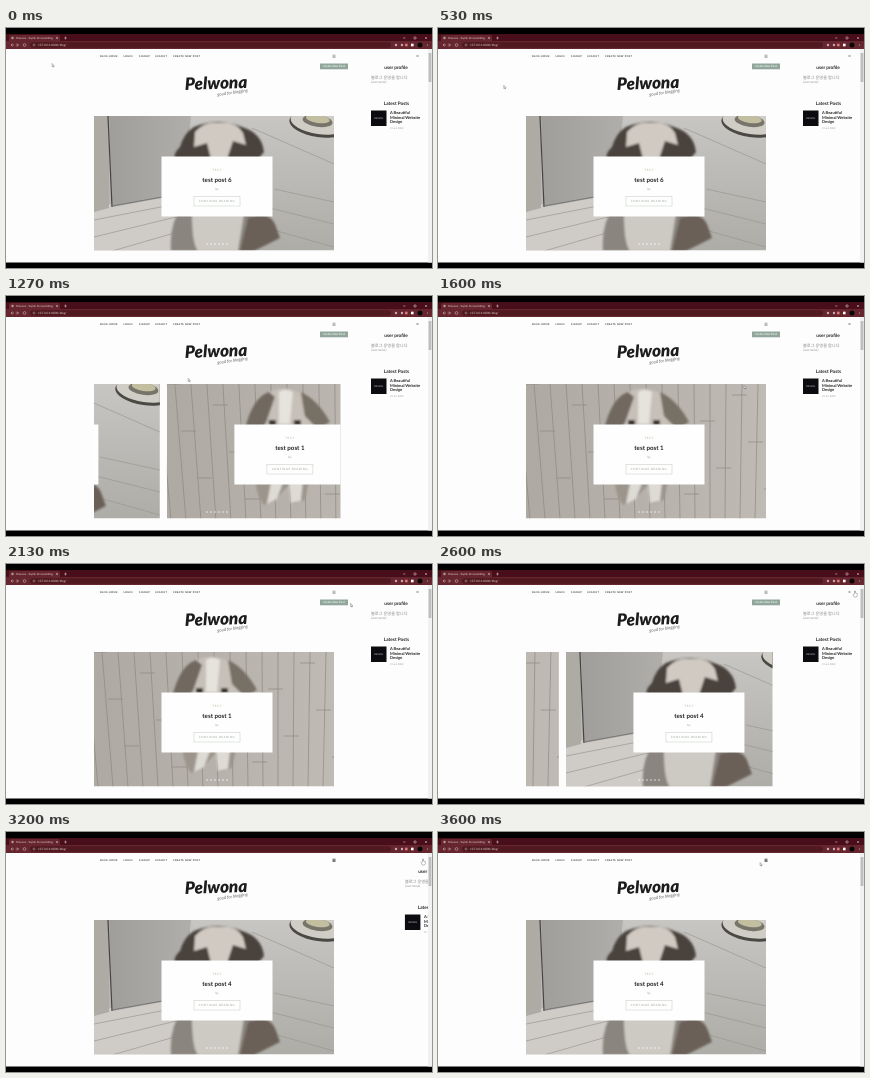
An HTML page for the animation above (3670 ms loop, 426 by 240 pixels).

```html
<!DOCTYPE html>
<html lang="en">
<head>
<meta charset="utf-8">
<title>Blog page</title>
<style>
html, body { margin: 0; width: 100%; height: 100%; overflow: hidden; background: #000; }
svg { display: block; width: 426px; height: 240px; }
text { font: 700 2.5px Lato, sans-serif; fill: #222; text-rendering: geometricPrecision; }
.mid { text-anchor: middle; }
.nav { letter-spacing: .3px; fill: #444; }
.chrome { font-weight: 400; font-size: 3px; fill: #e6d3d6; }
.head { font-size: 4.7px; }
.post { font-size: 4px; }
.soft { font-weight: 400; fill: #999; }
.korean { font: 400 4.2px "Noto Sans CJK KR", "Noto Sans CJK", sans-serif; fill: #888; }
.title { font-size: 6.2px; }
.logo { font-size: 17px; font-weight: 900; font-style: italic; fill: #1c1c1c; }
.tag { font-size: 4.3px; font-weight: 400; font-style: italic; fill: #666; }
</style>
</head>
<body>
<svg viewBox="0 0 426 240">
  <defs>
    <clipPath id="carousel"><rect x="88" y="88" width="246.5" height="134.5"/></clipPath>
    <clipPath id="photo"><rect width="240" height="134.5"/></clipPath>
    <clipPath id="page"><rect y="21" width="422" height="213"/></clipPath>
    <linearGradient id="door"><stop stop-color="#a09e9b"/><stop offset="1" stop-color="#b0aeab"/></linearGradient>
    <linearGradient id="floor" x2="0" y2="1"><stop stop-color="#c8c6c3"/><stop offset="1" stop-color="#aeaca7"/></linearGradient>
    <linearGradient id="wood"><stop stop-color="#aeaaa3"/><stop offset="1" stop-color="#bfbbb4"/></linearGradient>
    <filter id="blur"><feGaussianBlur stdDeviation=".9"/></filter>

    <g id="roomDog" clip-path="url(#photo)">
      <rect width="240" height="135" fill="url(#floor)"/>
      <path d="M0 92 86 72 100 135H0z" fill="#cfccc7"/>
      <path d="M0 104 82 88M0 121 82 101M18 135 84 116M180 73 240 86M172 91 240 108M176 113 240 131M158 12 240 48" stroke="#9a9792" stroke-width=".7"/>
      <path d="M0 0H15V92L0 96z" fill="#aeaaa4"/>
      <path d="M15 0H97L90 78 18 91z" fill="url(#door)"/>
      <path d="M14 0 18 91" stroke="#444" stroke-width="1.2"/>
      <path d="M18 90 90 77" stroke="#777"/>
      <g transform="rotate(8 224 9)">
        <ellipse cx="225" cy="8" rx="30" ry="13" fill="#4a4944"/>
        <ellipse cx="225" cy="6" rx="29" ry="12" fill="#cfcdc5"/>
        <ellipse cx="223" cy="5" rx="15" ry="6" fill="#77746a"/>
        <ellipse cx="223" cy="3" rx="12" ry="4" fill="#c2bea0"/>
      </g>
      <g filter="url(#blur)">
        <path d="M88 90Q75 108 77 135H160L158 92z" fill="#8a857e"/>
        <path d="M98 98Q98 128 104 135H144L150 98z" fill="#cdc9c3"/>
        <path d="M154 102Q174 94 181 108L186 122 160 135H146z" fill="#6a6158"/>
        <path d="M100 11Q125 1 148 11Q168 17 170 36L160 48H84Q76 40 86 31Q90 17 100 11z" fill="#4a423c"/>
        <path d="M101 16Q111 5 124 7Q142 4 149 17L152 29 139 25 133 43H117L113 27 100 31z" fill="#d0cac2"/>
      </g>
    </g>

    <g id="floorDog" clip-path="url(#photo)">
      <rect width="240" height="135" fill="url(#wood)"/>
      <path id="planks" fill="none" stroke="#8d8982" stroke-width=".7"/>
      <g filter="url(#blur)">
        <path d="M91 70Q84 106 97 121L108 116 124 99 126 120 138 116 146 78z" fill="#9c958c"/>
        <path d="M104 99 100 120 110 115 116 99zM122 99 124 119 134 117 136 98z" fill="#dedad4"/>
        <path d="M98 10Q116 0 136 10L149 42H88z" fill="#c6c0b8"/>
        <path d="M102 8Q86 13 78 45L88 53 99 39 108 13z" fill="#716960"/>
        <path d="M134 8Q151 16 163 38L151 45 138 32z" fill="#776f65"/>
        <path d="M112 8Q118 3 126 8L123 40H112z" fill="#e6e2dc"/>
        <path d="M102 36h7v5h-7zM127 36h7v5h-7z" fill="#35302c"/>
      </g>
    </g>
  </defs>

  <rect y="6" width="426" height="15" fill="#480f1a"/>
  <path d="M3 13.5V9Q3 7 5 7H52Q54 7 54 9V13.5z" fill="#66262f"/>
  <rect y="13" width="426" height="8" fill="#66262f"/>
  <circle cx="6.5" cy="10" r="1.2" fill="#b99"/>
  <text class="chrome" x="10" y="11" style="font-size:2.7px">Pelwona - Stylish Personal Blog</text>
  <path d="M50 9l2 2m0-2-2 2M58 10h3m-1.5-1.5v3M397 10h2.5M408 9h2v2h-2zM419 9l2 2m0-2-2 2M6.5 15.5 5 17l1.5 1.5M5 17h3M11 15.5l1.5 1.5-1.5 1.5M9.8 17h2.7" fill="none" stroke="#dcc5c9" stroke-width=".5"/>
  <circle cx="18.5" cy="17" r="1.4" fill="none" stroke="#dcc5c9" stroke-width=".5"/>
  <rect x="24" y="14.3" width="361" height="5.4" rx="2.7" fill="#50191f"/>
  <circle cx="28" cy="17" r="1" fill="none" stroke="#cbb" stroke-width=".4"/>
  <text class="chrome" x="32" y="18">127.0.0.1:8000/blog/</text>
  <g fill="#c9aab0">
    <circle cx="390" cy="17" r="1.2"/><circle cx="396" cy="17" r="1.2"/>
    <rect x="399" y="15.7" width="2.6" height="2.6" fill="#d77"/><rect x="405" y="15.7" width="2.6" height="2.6" fill="#fff"/>
    <circle cx="414" cy="17" r="2.5" fill="#080808"/><circle cx="421.5" cy="17" r=".6"/>
  </g>

  <rect y="21" width="426" height="213.5" fill="#fdfdfd"/>
  <text class="nav" x="94" y="29">BLOG HOME</text>
  <text class="nav" x="117.5" y="29">LOGIN</text>
  <text class="nav" x="133" y="29">SIGNUP</text>
  <text class="nav" x="149" y="29">LOGOUT</text>
  <text class="nav" x="167" y="29">CREATE NEW POST</text>
  <path id="menu" d="M326.5 27.2h3M326.5 28.3h3M326.5 29.4h3" stroke="#222" stroke-width=".7"/>
  <text class="logo" transform="translate(179 62) rotate(-2)">Pelwona</text>
  <text class="tag" transform="translate(211.5 68) rotate(-8)">good for blogging</text>

  <g clip-path="url(#carousel)"><g id="track"></g></g>
  <g id="dots" fill="#fff" fill-opacity=".8"></g>

  <g id="create">
    <rect x="314" y="35.5" width="28" height="5.8" fill="#91a79c"/>
    <text class="mid" x="328" y="39.2" style="fill:#e8efeb;font-size:2.9px">Create New Post</text>
  </g>

  <g clip-path="url(#page)"><g id="sidebar">
    <path d="M410.7 27.2l1.6 1.6m0-1.6-1.6 1.6" stroke="#333" stroke-width=".5"/>
    <text class="mid head" x="390" y="40.5">user profile</text>
    <text class="korean" x="365" y="50.5">블로그 운영을 합니다</text>
    <text class="soft" x="365" y="55.3" style="font-size:3.2px">(username)</text>
    <text class="mid head" x="390.5" y="77">Latest Posts</text>
    <rect x="365" y="82.5" width="15.5" height="15.5" fill="#0c0c10"/>
    <text class="mid" x="372.7" y="91.2" style="fill:#9a9aa8;font-size:2.4px">DESIGN</text>
    <text class="post" x="384" y="86.4">A Beautiful</text>
    <text class="post" x="384" y="90.6">Minimal Website</text>
    <text class="post" x="384" y="94.8">Design</text>
    <text class="soft" x="384" y="101">21 Jul, 2022</text>
  </g></g>

  <rect x="422" y="21" width="4" height="213.5" fill="#f1f1f1"/>
  <rect x="422.6" y="25" width="2.8" height="29" fill="#bebebe"/>

  <g id="cursor" fill="#fff" stroke="#444" stroke-width=".35">
    <path id="arrow" d="M-.9-1.5V1.7L-.2 1.1.3 2.2.8 2 .3 .9H1.3z"/>
    <path id="hand" d="M-.5 1V-2Q0-2.7.5-2V0L2.3.5V2.5L1.5 4H-.7L-2 1.7Q-1.6.7-.5 1z"/>
  </g>
</svg>
<script>
const $ = id => document.getElementById(id);
const LOOP = 3670, STEP = 1000 / 15, PITCH = 247;
const slideStarts = [1167, 2467];
const path = [[0, 47, 37], [1000, 84, 78], [1600, 307, 91], [2130, 345, 41], [2600, 417, 29], [3200, 417, 29], [3600, 323, 32], [LOOP, 323, 32]];

const slide = (photo, number, i) => `<g transform="translate(${88 + i * PITCH} 88)">
  <use href="#${photo}"/>
  <rect x="67.5" y="40.5" width="111" height="60" fill="#fefefe"/>
  <text class="mid soft" x="123" y="55" style="font-size:3px;letter-spacing:.6px;fill:#b5b59b">TEST</text>
  <text class="mid title" x="123" y="66">test post ${number}</text>
  <text class="mid soft" x="123" y="74" style="font-size:3px">by</text>
  <rect x="100" y="80.5" width="46" height="9.5" fill="none" stroke="#cdd3ca" stroke-width=".6"/>
  <text class="mid soft" x="123" y="86.2" style="font-size:2.9px;letter-spacing:.5px;fill:#9aa598">CONTINUE READING</text>
</g>`;

$("track").innerHTML = slide("roomDog", 6, 0) + slide("floorDog", 1, 1) + slide("roomDog", 4, 2);
$("dots").innerHTML = Array.from({ length: 6 }, (_, i) => `<circle cx="${201 + i * 4}" cy="216" r=".8"/>`).join("");
$("planks").setAttribute("d", Array.from({ length: 17 }, (_, i) => {
  const x = i * 16 - 8, y = i * 47 % 120;
  return `M${x} 0l${12 - i} 135M${x + 6} ${y}h15`;
}).join(""));

const progress = (t, start, length) => Math.min(1, Math.max(0, (t - start) / length));
const easeOut = p => 1 - (1 - p) ** 2.4;
const move = (id, x, y = 0) => $(id).setAttribute("transform", `translate(${x} ${y})`);
const show = (id, on) => $(id).setAttribute("visibility", on ? "visible" : "hidden");

function draw(now) {
  const t = Math.floor((now % LOOP + 4) / STEP) * STEP;
  move("track", -PITCH * slideStarts.reduce((sum, s) => sum + easeOut(progress(t, s, 250)), 0));

  const closing = progress(t, 3134, 350);
  move("sidebar", 86 * easeOut(closing));
  show("create", closing === 0);
  $("menu").setAttribute("opacity", closing ? 1 : .5);

  const i = path.findIndex((p, k) => t < path[k + 1][0]);
  const [t0, x0, y0] = path[i], [t1, x1, y1] = path[i + 1];
  const p = progress(t, t0, t1 - t0);
  move("cursor", x0 + (x1 - x0) * p, y0 + (y1 - y0) * p);
  const pointing = t > 2560 && t < 3240;
  show("hand", pointing);
  show("arrow", !pointing);
  requestAnimationFrame(draw);
}
requestAnimationFrame(draw);
</script>
</body>
</html>
```
